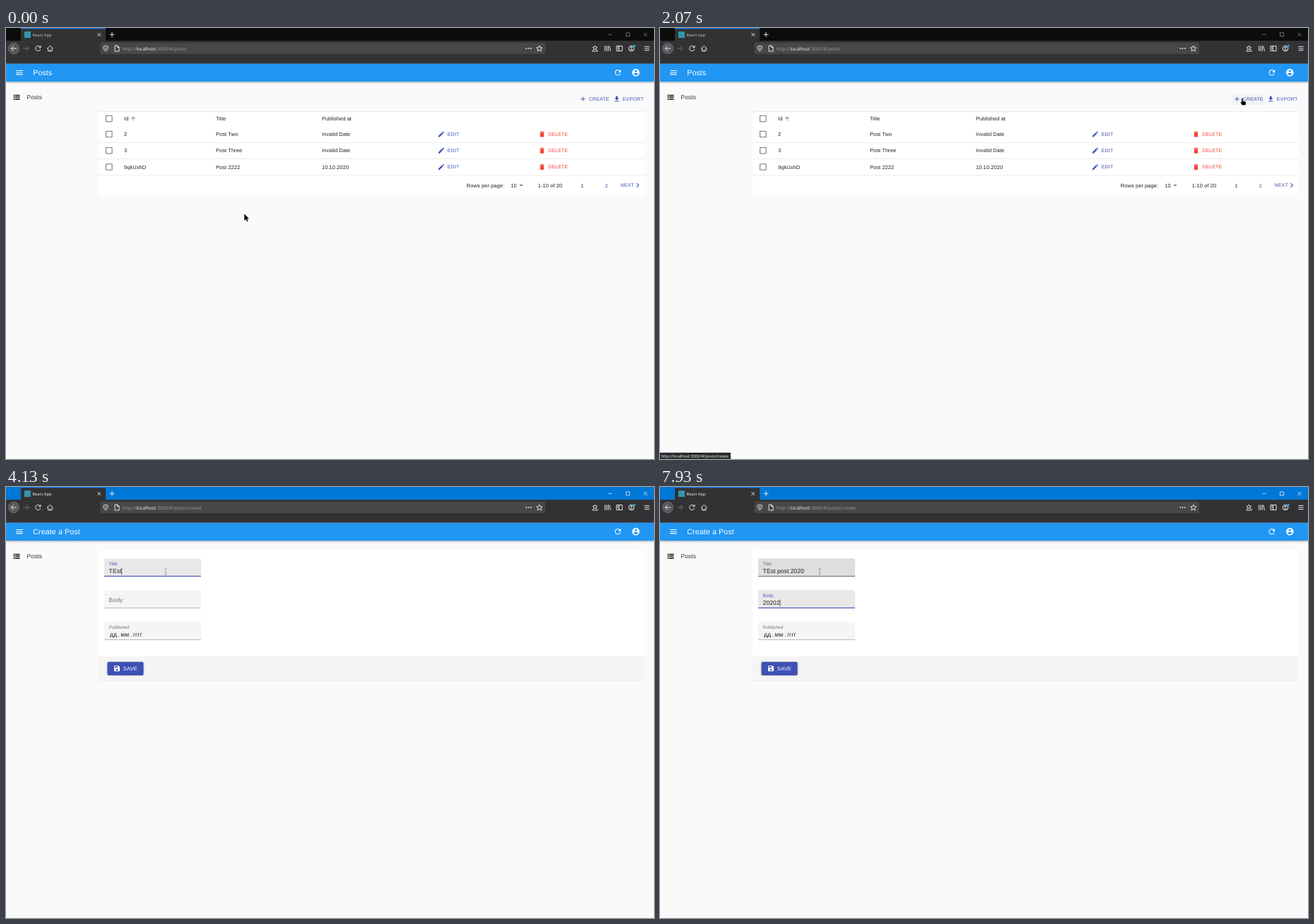
These frames come from a looping animation (917x611 px, 8 s). An HTML page:

```html
<!DOCTYPE html>
<html lang="en">
<head>
<meta charset="utf-8">
<title>Posts admin</title>
<style>
  html, body { margin: 0; width: 100%; height: 100%; overflow: hidden; background: #fafafa; }
  svg { display: block; width: 917px; height: 611px; }
  text { font-family: "Liberation Sans", Arial, sans-serif; letter-spacing: .01em; text-rendering: geometricPrecision; }
  .chrome { font-family: "Open Sans", "Noto Sans", sans-serif; letter-spacing: 0; }
  .caps { letter-spacing: .0286em; }
  .card { filter: drop-shadow(0 .6px .6px rgba(0,0,0,.32)); }
  .appbar { filter: drop-shadow(0 1px 1.6px rgba(0,0,0,.35)); }
  .line { fill: none; stroke: #f0f0f1; stroke-width: .95; }
</style>
</head>
<body>
<svg id="stage" viewBox="0 0 917 611"></svg>
<script>
const LOOP = 8000;
const PRIMARY = '#3f51b5', RED = '#f44336', INK = 'rgba(0,0,0,.87)', SOFT = 'rgba(0,0,0,.54)';
const BODY = 8.53, CELL = 7.47, SMALL = 6.93, LABEL = 6.4;

const ICONS = {
  menu: 'M3 18h18v-2H3zm0-5h18v-2H3zm0-7v2h18V6z',
  refresh: 'M17.65 6.35A8 8 0 1 0 19.73 14h-2.08A6 6 0 1 1 16.22 7.78L13 11h7V4z',
  account: 'M12 2a10 10 0 1 0 0 20 10 10 0 0 0 0-20zm0 3a3 3 0 1 1 0 6 3 3 0 0 1 0-6zm0 14.2c-2.5 0-4.7-1.3-6-3.2 0-2 4-3.1 6-3.1s6 1.100 6 3.100c-1.300 1.900-3.500 3.200-6 3.200z',
  list: 'M4 14h4v-4H4zm0 5h4v-4H4zM4 9h4V5H4zm5 5h12v-4H9zm0 5h12v-4H9zM9 5v4h12V5z',
  add: 'M19 13h-6v6h-2v-6H5v-2h6V5h2v6h6z',
  download: 'M19 9h-4V3H9v6H5l7 7zM5 18v2h14v-2z',
  edit: 'M3 17.25V21h3.75L17.8 9.940l-3.750-3.750zM20.700 7a1 1 0 0 0 0-1.400l-2.300-2.300a1 1 0 0 0-1.400 0l-1.900 1.800 3.750 3.750z',
  trash: 'M6 19a2 2 0 0 0 2 2h8a2 2 0 0 0 2-2V7H6zM19 4h-3.500l-1-1h-5l-1 1H5v2h14z',
  save: 'M17 3H5a2 2 0 0 0-2 2v14a2 2 0 0 0 2 2h14a2 2 0 0 0 2-2V7zM12 19a3 3 0 1 1 0-6 3 3 0 0 1 0 6zM15 9H5V5h10z',
  next: 'M10 6 8.600 7.400l4.600 4.600-4.600 4.600L10 18l6-6z',
  down: 'M7 10l5 5 5-5z',
  up: 'M4 12l1.400 1.400L11 7.800V20h2V7.800l5.600 5.600L20 12l-8-8z',
  box: 'M19 5v14H5V5h14m0-2H5a2 2 0 0 0-2 2v14a2 2 0 0 0 2 2h14a2 2 0 0 0 2-2V5a2 2 0 0 0-2-2z'
};

const text = (x, y, str, size, fill = INK, attrs = '') =>
  `<text x="${x}" y="${y}" font-size="${size}" fill="${fill}" ${attrs}>${str}</text>`;
const caps = (x, y, str, fill, size = SMALL, attrs = '') => text(x, y, str, size, fill, `class="caps" ${attrs}`);
const rect = (x, y, w, h, fill, attrs = '') =>
  `<rect x="${x}" y="${y}" width="${w}" height="${h}" fill="${fill}" ${attrs}/>`;
const icon = (name, cx, cy, size, fill, attrs = '') => {
  const k = size / 24;
  return `<path d="${ICONS[name]}" transform="translate(${cx - size / 2} ${cy - size / 2}) scale(${k})" fill="${fill}" ${attrs}/>`;
};
const line = (d, attrs = '') => `<path class="line" d="${d}" ${attrs}/>`;

function browser() {
  return rect(0, 0, 917, 18.5, '#0c0c0d', 'id="bar"')
    + rect(21, 0, 120, 19, '#323234') + rect(21, 0, 120, 1.2, '#0a84ff')
    + rect(26, 5, 9, 9, '#3595ad')
    + text(37.5, 11.9, 'React App', 5.75, '#ddd', 'class="chrome" id="tabName"')
    + line('M129.500 7.200l4.600 4.600m0-4.600l-4.600 4.600M146.500 9.300h7M150 5.800v7')
    + `<g id="winButtons" stroke="#999">` + ['M852.500 9.300h5', 'M877.500 6.800h5v5h-5z', 'M902.500 6.800l5 5m0-5l-5 5']
        .map(d => `<path d="${d}" fill="none" stroke-width=".7"/>`).join('') + '</g>'
    + rect(0, 18, 917, 32.6, '#323234')
    + '<circle cx="11" cy="29" r="7.900" fill="#59595b" stroke="#77777a" stroke-width=".5"/>'
    + line('M15 29H7.300M10.800 25.400L7.200 29l3.600 3.600')
    + line('M24.500 29h7.500M28.700 25.400L32.300 29l-3.600 3.600', 'style="stroke:#77777a"')
    + line('M48.600 27.400a3.600 3.600 0 1 0 .2 2.600M49 25v2.800h-2.800')
    + line('M58 29.300l4.300-4 4.300 4M59.500 28.500v4.300h5.600v-4.300M62.300 33v-2.500')
    + rect(133.5, 20.7, 629.5, 16.3, '#474749', 'rx="1.5"')
    + line('M141.200 25.200l3.100 1c0 3.500-.800 5.300-3.100 6.700-2.300-1.400-3.100-3.200-3.100-6.700zM141.200 27v4')
    + line('M154 25h3.800l2.300 2.300v5.700H154zM157.600 25v2.500h2.500')
    + `<text x="164.800" y="31.500" font-size="6.65" fill="#9c9c9f" class="chrome">http://<tspan fill="#f9f9fa">localhost</tspan>:3000/#/posts<tspan id="urlTail"></tspan></text>`
    + [736.4, 739.6, 742.8].map(x => `<circle cx="${x}" cy="29" r="1" fill="#e0e0e1"/>`).join('')
    + line('M754.800 25l1.200 2.700 2.900.300-2.200 1.900.700 2.900-2.600-1.500-2.600 1.500.700-2.900-2.200-1.900 2.900-.300z')
    + line('M833.500 25l1 2 2.200.300-1.600 1.500.400 2.100-2-1-2 1 .400-2.100-1.600-1.500 2.200-.300zM830 31.200v1.800h7.200v-1.800')
    + line('M847.700 25.300v7.500M850 25.300v7.500M852.300 25.300v7.500M853.700 25.500l1.900 7.300')
    + line('M864 25.500h8v7h-8zM867.500 25.500v7M865 27.500h1.500M865 29.500h1.500')
    + line('M881.300 29a3.800 3.800 0 1 0 7.600 0 3.800 3.800 0 0 0-7.600 0M882.500 31.500q2.600-1.500 5.200 0M884 27.800a1.100 1.100 0 1 0 2.200 0 1.100 1.100 0 0 0-2.200 0')
    + '<circle cx="889.300" cy="25.300" r="1.700" fill="#00a5e8"/>'
    + line('M903.500 26.400h7M903.500 29h7M903.500 31.600h7');
}

function frame() {
  return rect(0, 50.4, 917, 25.6, '#2196f3', 'class="appbar"')
    + icon('menu', 19, 63.2, 12.8, '#fff')
    + text(38.2, 66.9, 'Posts', 10.67, '#fff', 'id="heading"')
    + icon('refresh', 865.8, 63.2, 12.8, '#fff') + icon('account', 891.3, 63.2, 12.8, '#fff')
    + icon('list', 14.8, 98.3, 12.8, 'rgba(0,0,0,.7)') + text(29.4, 101.3, 'Posts', BODY, 'rgba(0,0,0,.8)');
}

function listRow(y, id, title, date) {
  return icon('box', 145.8, y, 12.8, SOFT)
    + text(167, y + 2.7, id, CELL) + text(297, y + 2.7, title, CELL) + text(447, y + 2.7, date, CELL)
    + icon('edit', 616, y, 10.67, PRIMARY) + caps(624.8, y + 2.4, 'EDIT', PRIMARY)
    + icon('trash', 758.5, y, 10.67, RED) + caps(767.2, y + 2.4, 'DELETE', RED)
    + rect(131, y + 11.7, 773, .55, '#dcdcdc');
}

function listPage() {
  const y = 223;
  return '<clipPath id="createClip"><rect x="809" y="93" width="47.500" height="16" rx="2"/></clipPath>'
    + rect(809, 93, 47.5, 16, PRIMARY, 'rx="2" id="createHover"')
    + `<circle cx="820.500" cy="100.500" r="0" fill="${PRIMARY}" clip-path="url(#createClip)" id="ripple"/>`
    + icon('add', 816.4, 100.7, 10.67, PRIMARY) + caps(824.8, 103.3, 'CREATE', PRIMARY)
    + icon('download', 864.3, 100.7, 10.67, PRIMARY) + caps(872.8, 103.3, 'EXPORT', PRIMARY)
    + rect(131, 118.6, 773, 118.3, '#fff', 'rx="2" class="card"')
    + icon('box', 145.8, 128.5, 12.8, SOFT)
    + text(167, 131.2, 'Id', CELL) + icon('up', 180, 128.5, 9.2, SOFT)
    + text(297, 131.2, 'Title', CELL) + text(447, 131.2, 'Published at', CELL)
    + listRow(150.5, '2', 'Post Two', 'Invalid Date')
    + listRow(173.7, '3', 'Post Three', 'Invalid Date')
    + listRow(197, '9qkUxhD', 'Post 2222', '10.10.2020')
    + text(651.8, y + 2.7, 'Rows per page:', CELL) + text(714.3, y + 2.7, '10', CELL)
    + icon('down', 729, y, 12.8, SOFT)
    + text(752.8, y + 2.7, '1-10 of 20', CELL)
    + caps(813.5, y + 2.5, '1', INK) + caps(847.7, y + 2.5, '2', PRIMARY)
    + caps(869.6, y + 2.3, 'NEXT', PRIMARY) + icon('next', 894, y, 12.8, PRIMARY);
}

function field(id, top, label) {
  return `<g id="${id}"><path class="bg" d="M139 ${top + 25.6}V${top + 2}q0-2 2-2H274q2 0 2 2V${top + 25.6}z"/>`
    + rect(139, top + 25, 137, .6, '#000', 'class="rule"')
    + rect(139, top + 24.6, 137, 1.1, PRIMARY, 'class="accent"')
    + text(145.6, top + 9.5, label, LABEL, SOFT, 'class="label"')
    + text(145.6, top + 20.5, '', BODY, INK, 'class="value"')
    + rect(145.6, top + 13, .65, 10, '#222', 'class="caret"') + '</g>';
}

function createPage() {
  return rect(131, 89, 773, 185.3, '#fff', 'rx="2" class="card"')
    + rect(131, 240, 773, 34.3, '#f5f5f5')
    + field('title', 101.3, 'Title') + field('body', 146.3, 'Body') + field('date', 191.2, 'Published')
    + [[147, 'дд'], [158.3, '.'], [162.3, 'мм'], [176.3, '.'], [179.9, 'гггг']]
        .map(([x, s]) => text(x, 211.5, s, BODY)).join('')
    + rect(143.5, 248, 51, 19, '#000', 'rx="2" id="saveBg"')
    + `<g id="saveInk">${icon('save', 157, 257.3, 10.67, 'inherit').replace('fill="inherit"', '')}${
        caps(165.8, 260, 'SAVE', 'inherit', CELL).replace('fill="inherit"', '')}</g>`;
}

const CURSORS = {
  arrow: '<path d="M0 0V10.500L2.400 8.300 4 11.800 5.800 11 4.300 7.700H7.200Z" stroke="#fff" stroke-width=".4"/>',
  hand: '<path d="M0 0c.9 0 1 .7 1 1.200V4l3 .600c1 .200 1.400.800 1.300 1.800L4.800 10H-.300L-2.600 6.300c-.500-.800.400-1.400 1-.900l.600.600V1.200C-1 .600-.700 0 0 0Z" stroke="#fff" stroke-width=".4"/>',
  beam: '<path d="M-1.300-4H-.300L0-3.700.300-4H1.300M0-3.700V3.700M-1.300 4H-.300L0 3.700.300 4H1.300" fill="none" stroke="#666" stroke-width=".6"/>'
};

const stage = document.getElementById('stage');
stage.innerHTML = rect(0, 0, 917, 611, '#fafafa')
  + `<g id="listPage">${listPage()}</g><g id="createPage">${createPage()}</g>`
  + frame() + browser()
  + '<g id="status">' + rect(0, 602, 100, 9, '#2a2a2e')
  + text(1.6, 608.8, 'http://localhost:3000/#/posts/create', 5.66, '#f9f9fa', 'class="chrome"') + '</g>'
  + '<g id="cursor">' + Object.entries(CURSORS).map(([k, s]) => `<g id="${k}">${s}</g>`).join('') + '</g>';

const $ = id => document.getElementById(id);
const set = (el, attrs) => { for (const k in attrs) el.setAttribute(k, attrs[k]); };
const show = (el, on) => el.setAttribute('visibility', on ? 'inherit' : 'hidden');
const clamp = p => Math.max(0, Math.min(1, p));
const easeOut = p => 1 - (1 - p) ** 3;
const easeBoth = p => p * p * (3 - 2 * p);
const ramp = (t, start, dur, ease = easeOut) => ease(clamp((t - start) / dur));
const mix = (a, b, p) => a + (b - a) * p;
const rgba = (r, g, b, a) => `rgba(${r},${g},${b},${a})`;

// Event times in ms
const HOVER = 1730, PRESS = 2130, NAVIGATE = 2400, OVER_FIELD = 2900, FOCUS = 3070, TAB = 6270;

const PATH = [
  [0, 337, 263], [70, 341, 264], [200, 384, 272.5], [400, 382, 270], [530, 420, 243], [730, 470.300, 219.500],
  [1000, 470, 219.500], [1130, 415, 195], [1270, 364, 150], [1400, 450, 105], [1530, 640, 84],
  [1670, 795, 88], [1800, 823, 99], [2070, 824, 99.500], [2200, 820, 98.500], [2330, 820, 98.500],
  [2400, 805, 112], [2530, 706, 151], [2670, 540, 146], [2800, 360, 129], [2930, 240, 120],
  [3070, 226, 119], [3270, 226, 119], [3400, 226, 120]
];
const TITLE_KEYS = [3870, 3930, 4070, 4130, 4870, 4930, 5070, 5130, 5330, 5470, 5600, 5730, 5870, 6000];
const BODY_KEYS = [7470, 7600, 7670, 7800, 7930];
const CARET_OFF = [[3400, 3600], [4400, 4600], [6530, 6800], [7070, 7270]];

function pointAt(t) {
  const i = PATH.findIndex(p => p[0] > t);
  if (i < 0) return PATH[PATH.length - 1].slice(1);
  const [a, b] = [PATH[i - 1], PATH[i]], p = (t - a[0]) / (b[0] - a[0]);
  return [mix(a[1], b[1], p), mix(a[2], b[2], p)];
}

const typed = (str, keys, t) => str.slice(0, keys.filter(k => k <= t).length).replace(/ /g, '\u00a0');

function drawField(id, top, s) {
  const part = name => $(id).querySelector('.' + name);
  set(part('bg'), { fill: rgba(0, 0, 0, s.shade) });
  set(part('rule'), { 'fill-opacity': s.rule });
  set(part('accent'), { x: 207.5 - 68.5 * s.accent, width: 137 * s.accent, 'fill-opacity': s.accentAlpha });
  set(part('label'), {
    y: top + mix(16.5, 9.5, s.shrink), 'font-size': mix(BODY, LABEL, s.shrink),
    fill: s.focused ? PRIMARY : SOFT
  });
  const value = part('value');
  if (value.textContent !== s.value) value.textContent = s.value;
  show(part('caret'), s.caret);
  if (s.caret) set(part('caret'), { x: 145.6 + (s.value ? value.getComputedTextLength() : 0) });
}

function render(t) {
  const active = t >= PRESS, creating = t >= NAVIGATE;
  set($('bar'), { fill: active ? '#0078d7' : '#0c0c0d' });
  set($('tabName'), { fill: active ? '#f9f9fa' : '#c4c4c6' });
  set($('winButtons'), { stroke: active ? '#fff' : '#999' });
  $('urlTail').textContent = t >= 2270 ? '/create' : '';
  $('heading').textContent = creating ? 'Create a Post' : 'Posts';
  show($('listPage'), !creating);
  show($('createPage'), creating);

  set($('createHover'), { 'fill-opacity': .04 * ramp(t, HOVER, 250) });
  set($('ripple'), { r: 38 * ramp(t, PRESS, 480, easeBoth), 'fill-opacity': t >= PRESS ? .24 : 0 });
  show($('status'), t >= HOVER && t < 2470);
  set($('status'), { opacity: 1 - .72 * ramp(t, 2200, 130, p => p) - .28 * ramp(t, 2340, 130, p => p) });

  const caretOn = !CARET_OFF.some(([a, b]) => t >= a && t < b);
  const inTitle = t >= FOCUS && t < TAB, inBody = t >= TAB;
  const over = ramp(t, OVER_FIELD, 200), focus = ramp(t, FOCUS, 200), tab = ramp(t, TAB, 200);
  drawField('title', 101.3, {
    shade: .04 + .09 * over - .04 * focus + .04 * tab,
    rule: .42 + .45 * over, accent: focus, accentAlpha: 1 - tab, shrink: focus, focused: inTitle,
    value: typed('TEst post 2020', TITLE_KEYS, t), caret: inTitle && caretOn
  });
  drawField('body', 146.3, {
    shade: .04 + .05 * tab, rule: .42, accent: tab, accentAlpha: 1, shrink: tab, focused: inBody,
    value: typed('20202', BODY_KEYS, t), caret: inBody && caretOn
  });
  drawField('date', 191.2, { shade: .04, rule: .42, accent: 0, accentAlpha: 0, shrink: 1, value: '', caret: false });

  const ready = ramp(t, TITLE_KEYS[0] - 30, 250, easeBoth);
  set($('saveBg'), {
    fill: rgba(63 * ready, 81 * ready, 181 * ready, mix(.12, 1, ready)),
    style: `filter:drop-shadow(0 .9px .9px rgba(0,0,0,${.35 * ready}))`
  });
  set($('saveInk'), { fill: rgba(255 * ready, 255 * ready, 255 * ready, mix(.26, 1, ready)) });

  const [x, y] = pointAt(t);
  const kind = t >= OVER_FIELD ? 'beam' : t >= HOVER && t < 2200 ? 'hand' : 'arrow';
  for (const k in CURSORS) show($(k), k === kind);
  set($('cursor'), { transform: `translate(${x} ${y})` });
}

const start = performance.now();
function tick() {
  render((performance.now() - start) % LOOP);
  requestAnimationFrame(tick);
}
tick();
</script>
</body>
</html>
```
